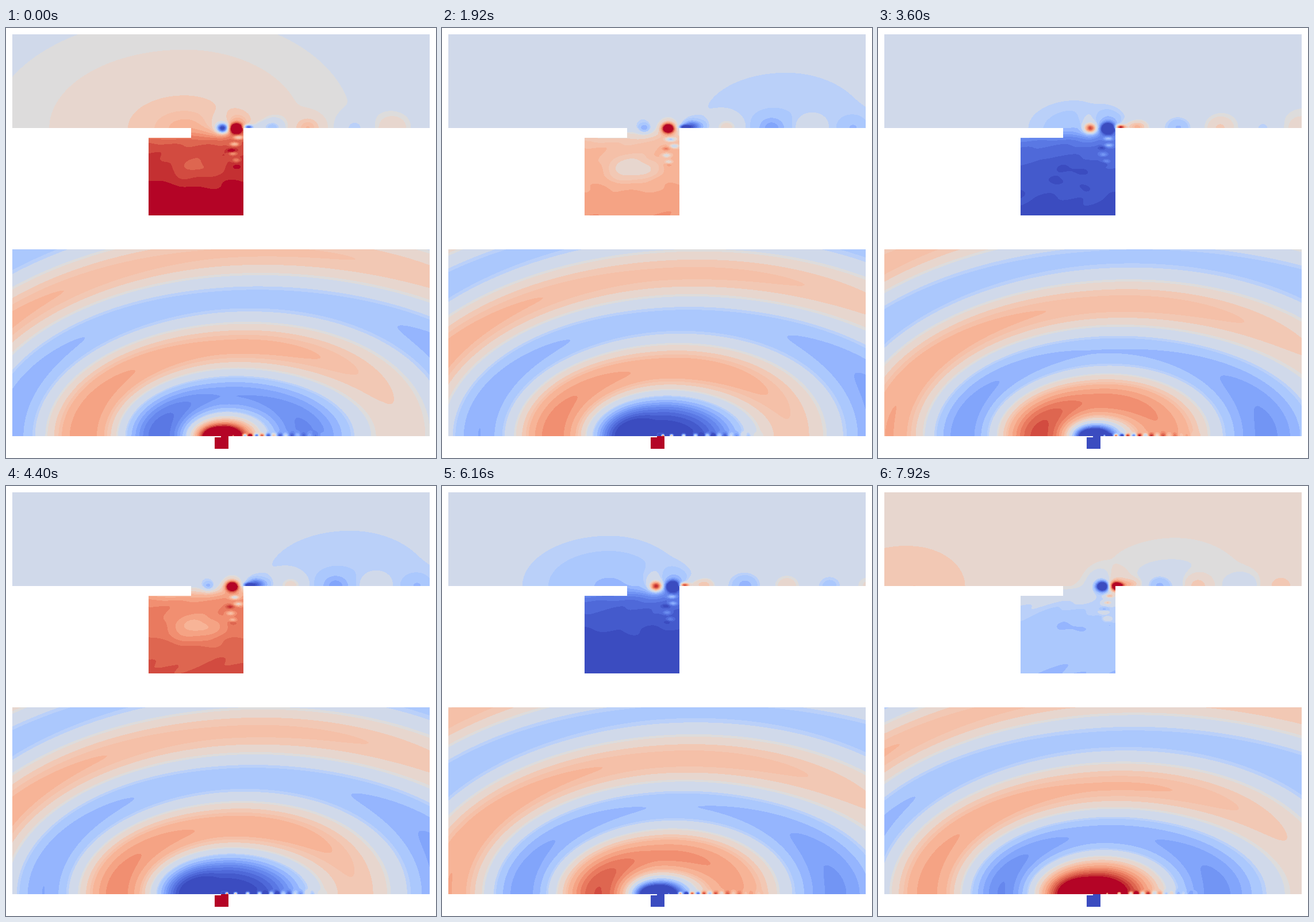
Write an HTML page with a canvas that moves like this. It is 748 by 748 pixels and loops after 8000 ms.

```html
<!DOCTYPE html>
<html lang="en">
<head>
<meta charset="utf-8">
<title>Cavity acoustics</title>
<style>
html, body { margin: 0; width: 100%; height: 100%; overflow: hidden; background: #fff; }
canvas { display: block; }
</style>
</head>
<body>
<canvas id="stage" width="748" height="748"></canvas>
<script>
const SIZE = 748, LOOP = 8000, STEP = 80, PERIOD = 2480;
const ctx = document.getElementById('stage').getContext('2d');
const image = ctx.createImageData(SIZE, SIZE);
const pixels = new Uint32Array(image.data.buffer);

// Upper limit of each colour band, pressure mapped to 0..1
const bands = [
  [.04, '3b4cc0'], [.085, '445acc'], [.125, '4f69d9'], [.165, '5a78e4'],
  [.205, '6687ed'], [.24, '7295f4'], [.28, '82a5fb'], [.325, '95b5fe'],
  [.38, 'abc8fd'], [.4, 'bad0f9'], [.49, 'd0d9ea'], [.51, 'dddcdc'],
  [.572, 'e7d6ce'], [.61, 'f2c8b4'], [.637, 'f5c0a8'], [.69, 'f7b497'],
  [.735, 'f5a384'], [.775, 'f18f71'], [.815, 'e97a5f'], [.86, 'de6650'],
  [.9, 'd24b40'], [.945, 'c43032'], [2, 'b40426']
];
const shades = new Uint32Array(1001);
for (let i = 0; i <= 1000; i++) {
  const rgb = parseInt(bands.find(b => i / 1000 < b[0])[1], 16);
  shades[i] = (255 << 24 | (rgb & 255) << 16 | (rgb & 0xff00) | rgb >> 16) >>> 0;
}
const shade = v => shades[Math.max(0, Math.min(1000, (v + .5) * 1000 | 0))];

// Piecewise linear lookup, the last segment is extended
function along(points, x) {
  let i = 1;
  while (i < points.length - 1 && x > points[i][0]) i++;
  const [x0, y0] = points[i - 1], [x1, y1] = points[i];
  return y0 + (y1 - y0) * (x - x0) / (x1 - x0);
}

// phase, level, left swell, its x, right swell, its x, cavity level, slope, core
const keys = [
  [0, -.03, .2, 310, 0, 560, .44, .07, -.07],
  [.161, .045, .135, 265, -.04, 540, .14, .03, -.1],
  [.194, .045, .07, 60, -.1, 510, -.14, -.04, -.05],
  [.419, .034, -.18, 400, 0, 550, -.41, -.03, -.09],
  [.484, -.045, -.155, 290, 0, 560, -.47, -.08, 0],
  [.774, -.085, .01, 330, -.05, 590, .18, .05, -.14]
];
keys.push([1, ...keys[0].slice(1)]);

function stateAt(phase) {
  let i = 1;
  while (phase > keys[i][0]) i++;
  const a = keys[i - 1], b = keys[i], k = (phase - a[0]) / (b[0] - a[0]);
  return a.map((v, j) => v + (b[j] - v) * k);
}

// Travel of a vortex through the mouth and down the wall
const path = [[.25, 345], [.42, 366], [.6, 383], [.774, 393], [1, 400], [1.18, 411],
  [1.42, 450], [1.774, 495], [2, 525], [2.42, 590], [3, 672]];
const nearGain = [[345, 0], [368, .5], [395, .85], [411, .8], [422, .2], [500, .14], [740, .07]];
const farGain = [[377, 0], [382, .8], [390, .7], [430, .45], [480, .2], [550, .03]];

function panel(x, y, w, h) {
  return { x, y, w, h, v: new Float32Array(w * h) };
}
function eachCell(p, fn) {
  for (let j = 0, i = 0; j < p.h; j++)
    for (let c = 0; c < p.w; c++, i++) p.v[i] = fn(p.x + c, p.y + j, i);
}
function blob(p, x, y, sx, sy, amp) {
  const x0 = Math.max(p.x, Math.floor(x - 3 * sx)), x1 = Math.min(p.x + p.w, x + 3 * sx);
  const y0 = Math.max(p.y, Math.floor(y - 3 * sy)), y1 = Math.min(p.y + p.h, y + 3 * sy);
  for (let j = y0; j < y1; j++)
    for (let i = x0; i < x1; i++)
      p.v[(j - p.y) * p.w + i - p.x] +=
        amp * Math.exp(-(((i - x) / sx) ** 2 + ((j - y) / sy) ** 2));
}
function paint(p, inside) {
  for (let j = 0, i = 0; j < p.h; j++)
    for (let c = 0; c < p.w; c++, i++)
      if (!inside || inside(p.x + c, p.y + j))
        pixels[(p.y + j) * SIZE + p.x + c] = shade(p.v[i]);
}

const near = panel(11, 11, 726, 315);
const far = panel(11, 385, 726, 325);
const inNear = (x, y) => y < 174 || (x >= 248 && x < 413 && (y >= 191 || x >= 322));

// Standing parts of the convected sound wave: cosine, sine and mean
const MACH = .13, STRETCH = 1.77, WAVE = 162;
const waveCos = new Float32Array(far.v.length), waveSin = waveCos.slice(), mean = waveCos.slice();
eachCell(far, (x, y, i) => {
  const dx = x - 375, dy = (710 - y) * STRETCH, m = 1 - MACH * MACH;
  const dist = (Math.sqrt(dx * dx + m * dy * dy) - MACH * dx) / m / 1.785;
  const side = dx / (Math.hypot(dx, dy) + 1);
  const amp = (.085 + 12.5 / (dist + 2)) * (1 + .45 * Math.max(0, -side) ** 1.5);
  const angle = 2 * Math.PI * (dist - 157) / WAVE;
  waveCos[i] = amp * Math.cos(angle);
  waveSin[i] = amp * Math.sin(angle);
  mean[i] = -.008 - .1 * Math.max(0, side) ** 3 * Math.min(1, dist / 150);
  return 0;
});

function swell(x, y, cx) {
  const dx = (x - cx) / (x < cx ? 1.72 : 1.5), dy = y - 174;
  return Math.exp(-Math.sqrt(dx * dx + dy * dy) / 85);
}

function drawNear(phase, state, boost) {
  const [, level, left, lx, right, rx, base, slope, core] = state;
  const cavity = base + boost;
  eachCell(near, (x, y) => {
    if (!inNear(x, y)) return 0;
    let v = level + left * swell(x, y, lx) + right * swell(x, y, rx);
    if (y < 135) return v;
    let w = 1 / (1 + Math.exp((184 - y) / 7));
    if (y < 174) w *= Math.exp(-(((x - 362) / 42) ** 2));
    if (w < .002) return v;
    const ripple = .012 * Math.sin(x / 13 + 2 * Math.sin(y / 17)) * Math.sin(y / 9 + x / 31);
    const inner = cavity + slope * (y - 258) / 67 + ripple +
      core * Math.exp(-(((x - 330) / 48) ** 2) - ((y - 246) / 24) ** 2);
    return v + (inner - v) * w;
  });

  for (let n = 0; n < 5; n++)
    for (const sign of [1, -1]) {
      const age = phase + n - (sign < 0 ? .47 : 0);
      if (age < .25) continue;
      const x = along(path, age), gain = sign * Math.max(0, along(nearGain, x));
      if (x < 415) {
        blob(near, x, 174, 10, 8, gain);
        blob(near, x, 170, 23, 22, gain * .16);
      } else {
        const s = Math.min(19, 8 + (x - 415) / 7);
        blob(near, x, 173, s * 1.2, s, gain);
      }
    }

  const turn = 2 * Math.PI * phase;
  blob(near, 421, 172, 8, 4, -.6 * Math.cos(turn - 5.65));
  blob(near, 438, 170, 18, 9, -.17 * Math.cos(turn - 5.1));
  // Small eddies shed down the rear wall
  const eddy = cavity > 0 ? -.26 : .2;
  for (let n = 0; n < 6; n++) {
    const fall = (phase * .6 + n * .37) % 1;
    blob(near, 404 - 15 * Math.abs(Math.sin(n * 2.3 + fall)), 190 + 9 * n + 7 * fall,
      8 - n * .4, 3.5, eddy * (n % 3 === 2 ? -.7 : 1) * (1 - n * .12));
  }
  paint(near, inNear);
}

function drawFar(phase, cavity) {
  const c = Math.cos(2 * Math.PI * phase), s = Math.sin(2 * Math.PI * phase);
  for (let i = 0; i < far.v.length; i++)
    far.v[i] = mean[i] + waveCos[i] * c + waveSin[i] * s;
  for (let n = 0; n < 10; n++)
    for (const sign of [1, -1]) {
      const age = phase + n - (sign < 0 ? .47 : 0);
      if (age < .25) continue;
      const x = 387 + (along(path, age) - 413) / 6.9;
      const size = Math.min(7, 2.6 + Math.max(0, x - 390) / 30);
      blob(far, x, 708.5, size, size * .8, sign * Math.max(0, along(farGain, x)));
    }
  paint(far);
  const fill = shade(cavity * 5);
  for (let y = 710; y < 732; y++)
    for (let x = y < 712 ? 374 : 363; x < 387; x++) pixels[y * SIZE + x] = fill;
}

function draw(time) {
  const phase = time / PERIOD % 1, state = stateAt(phase);
  const boost = .14 * Math.exp(-(((time - 4400) / 500) ** 2));
  pixels.fill(0xffffffff);
  drawNear(phase, state, boost);
  drawFar(phase, state[6] + boost);
  ctx.putImageData(image, 0, 0);
}

let start = null, last = -1;
function tick(now) {
  if (start === null) start = now;
  const step = Math.floor((now - start) % LOOP / STEP);
  if (step !== last) draw((last = step) * STEP);
  requestAnimationFrame(tick);
}
requestAnimationFrame(tick);
</script>
</body>
</html>
```
